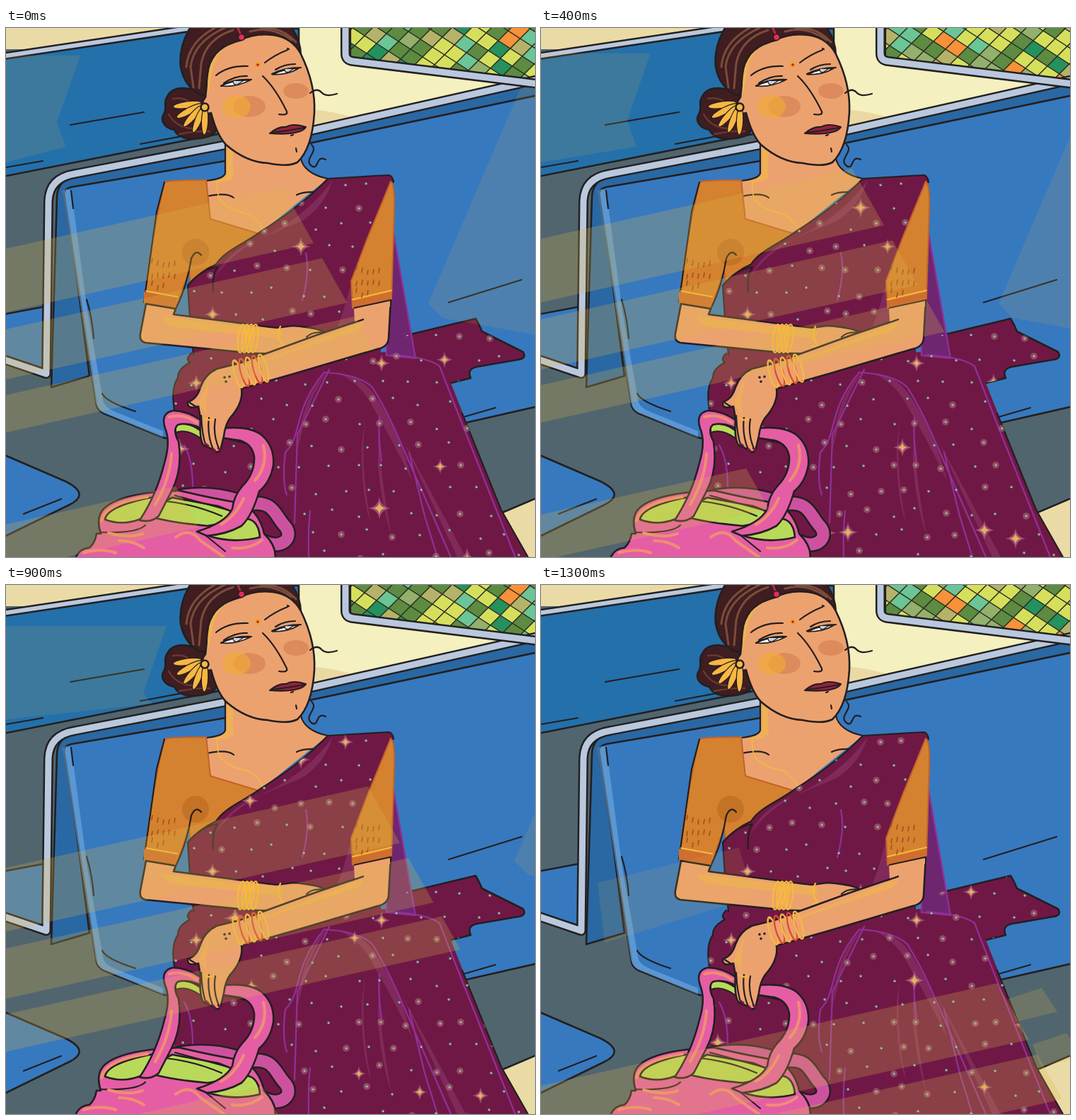
Recreate the animation shown at these times as an HTML page. Size 748 px wide and 748 px high, loop 1.5 s.

```html
<!DOCTYPE html>
<html lang="en">
<head>
<meta charset="utf-8">
<title>Afternoon train</title>
<style>
html, body { margin: 0; height: 100%; overflow: hidden; background: #51656f }
svg { display: block; width: 100vw; height: 100vh }
path, polygon { stroke-linejoin: round; stroke-linecap: round }
.o { stroke: #231f20; stroke-width: 2.6 }
.l { fill: none; stroke: #231f20; stroke-width: 2.2 }
.skin { fill: #eca26f }
.saree { fill: #701845 }
.blouse { fill: #d4822f; stroke: #c4622a; stroke-width: 2 }
.fold { fill: none; stroke: #91309a; stroke-width: 2.2 }
.sheen { fill: #a0508a; opacity: .33 }
.gold { fill: none; stroke: #f7b93e; stroke-width: 2.4 }
.warm { fill: #f0b450 }
.pink { fill: #e55ea5 }
.lime { fill: #b9d95b }
.crease { fill: none; stroke: #f08d72; stroke-width: 4 }
</style>
</head>
<body>
<svg viewBox="0 0 748 748">
<defs>
  <clipPath id="pane"><path d="M487-2V38Q487 41 492 42L748 74V-2Z"/></clipPath>
  <clipPath id="cloth"><use href="#tail"/><use href="#skirt"/><use href="#drape"/></clipPath>
  <path id="railL" d="M312 165L98 206Q61 212 60 245L57 489L-8 467"/>
  <path id="railR" d="M432 145L756 72"/>
  <path id="railB" d="M-5 40L270-1"/>
  <path id="frame" d="M480-8V36Q480 46 491 47L760 80"/>
  <path id="strapBack" d="M247 662C290 655 320 665 345 673C380 668 380 690 395 705C408 722 388 738 365 726"/>
</defs>

<!-- carriage -->
<rect width="748" height="748" fill="#51656f"/>
<path d="M0 0H420V30H0Z" fill="#eadba6"/>
<path d="M413 0H748V90L420 160Z" fill="#f4f0bf"/>
<path d="M430 115Q470 118 500 130L425 150Z" fill="#ebd9a4"/>
<path class="o" d="M-4 43L270 1H414V130L300 150L-4 210Z" fill="#2470aa"/>
<g id="tiles" clip-path="url(#pane)"></g>
<path class="l" d="M487-2V38Q487 41 492 42L748 74M91 137L195 119M190 164L280 147M0 197L52 188"/>
<path class="o" d="M-4 405L60 393V490L-4 470Z" fill="#3779bf"/>
<path class="o" d="M72 240Q72 215 100 208L312 166L430 146L752 76V110L310 200L85 235L118 492L64 508Z" fill="#2a68a3"/>
<path class="o" d="M82 234Q82 228 92 225L310 188L752 95V535L620 565L225 580L138 545Q130 541 128 534Z" fill="#3779bf"/>
<path d="M80 231Q89 223 93 235L115 400L138 530Q142 538 155 543L222 570V579L140 545Q130 541 127 530Z" fill="#7fb5e8" opacity=".5"/>
<path class="l" d="M114 384Q122 410 124 439M136 517Q142 529 183 542M92 230L95 255M626 388L729 356M647 550L692 537"/>
<g id="rails"></g>
<path class="o" d="M700 686L752 664V752H736Z" fill="#eadba6"/>
<path class="o" d="M-4 603L84 641Q120 659 90 674L-4 720Z" fill="#3779bf"/>
<path class="l" d="M25 687L78 666"/>

<!-- bun, neck and head -->
<path class="o" d="M283 98C265 82 236 80 228 97C222 104 228 112 224 120C216 132 226 142 238 144C245 160 272 158 284 154Q298 151 300 135Z" fill="#3f1d20"/>
<path d="M236 100Q260 95 270 120M230 122Q240 140 262 142M245 150Q270 145 288 146" fill="none" stroke="#693932" stroke-width="2.4"/>
<path class="skin" d="M310 145V205Q309 213 284 216L289 271L358 291L455 213Q430 212 417 185Z"/>
<path class="l" d="M310 150V205Q309 213 284 216M417 185Q422 206 455 213M284 238Q312 232 322 240M411 236Q420 231 441 232M276 254Q270 265 276 276"/>
<path class="warm" d="M313 163L323 168Q319 190 322 210Q315 220 286 218Q307 216 312 207Z" opacity=".85"/>
<path class="gold" d="M299 217Q297 236 305 246C325 264 338 258 348 266Q360 276 362 283" style="stroke-width:1.6"/>
<path class="o" d="M262-3Q244 25 247 55Q252 82 274 94L290 95L310 45L333 20L390 20L417 38Q416 15 402-3Z" fill="#3f1d20"/>
<path class="o skin" d="M333 17Q293 27 286 58L282 98Q275 106 279 116Q284 123 290 120Q298 151 311 165Q340 190 370 191Q398 197 412 190Q433 170 436 120Q438 80 417 37Q405 14 378 10Q350 7 333 17Z"/>
<path d="M321 3Q283 15 276 50L273 85M309 0Q265 20 261 55L265 84M295 0Q258 20 255 55M345 5Q375-4 404 17M360 0Q390-2 410 20" fill="none" stroke="#7a4c3b" stroke-width="3"/>
<path d="M327-2L333 12" stroke="#b32b49" stroke-width="3"/>
<circle class="o" cx="333" cy="13" r="4.5" fill="#e52c59" style="stroke-width:1.5"/>
<path class="warm" d="M322 22Q298 30 292 59L286 93Q282 60 297 38Q308 26 322 22Z"/>
<ellipse cx="344" cy="111" rx="23" ry="15" fill="#d98357" opacity=".75"/>
<ellipse cx="326" cy="111" rx="20" ry="16" fill="#f1ad35" opacity=".65"/>
<ellipse cx="410" cy="89" rx="18" ry="11" fill="#d98357" opacity=".75"/>
<g class="l">
  <path d="M304 82Q322 73 345 74Q325 84 304 82ZM377 66Q392 58 414 57Q400 66 377 66Z" fill="#fff" style="stroke-width:1.6"/>
  <path d="M297 67Q314 53 342 54M366 49Q380 38 398 31M304 82Q320 72 347 73M376 65Q393 56 417 56M308 78Q325 67 341 68M381 59Q393 51 409 51"/>
  <path d="M321 75Q321 81 327 80L335 75M394 58Q394 64 400 62L406 58" fill="#c5d3df" style="stroke-width:1.2"/>
  <path d="M363 68Q381 85 397 118Q399 124 386 122M403 152L406 151M410 170L411 175M398 29L400 30"/>
  <path d="M373 149Q385 139 396 140Q406 134 424 140Q417 152 373 149Z" fill="#97203e"/>
  <path d="M376 148Q400 145 422 141"/>
  <path d="M430 92Q440 84 446 91T468 93M432 165C443 175 420 185 432 195C443 202 437 179 452 186"/>
</g>
<circle cx="356" cy="52" r="4.2" fill="#f2a12e"/><circle cx="356" cy="52" r="1.8" fill="#b51e37"/>
<g id="earring"></g>

<!-- clothes -->
<path id="tail" class="o saree" d="M560 436L664 411L669 420L673 429L731 458Q737 467 724 469L672 478Q650 480 657 495L625 503L565 480Z"/>
<path id="skirt" class="saree" d="M262 460Q253 468 260 473Q242 482 243 495Q232 510 239 545L242 620L225 748H738L700 681L627 497Q618 474 595 468L545 458L400 462Z"/>
<path class="l" d="M262 460Q253 468 260 473Q242 482 243 495Q232 510 239 545L242 620M645 545L700 681L738 748"/>
<path class="fold" d="M548 290L579 467L538 463V390Z" style="fill:#6f2670"/>
<path class="blouse" d="M224 218Q230 215 283 215L289 270L358 291L299 338L261 362L259 343L240 397L195 388Q205 300 224 218Z"/>
<path id="drape" class="saree" d="M455 213L541 208Q547 209 548 218L508 310L488 360L497 398L530 420V466H265L260 410L257 364Q273 345 297 334C310 314 336 306 360 288Q420 250 455 213Z"/>
<path class="l" d="M265 462L260 410L257 364Q273 345 297 334C310 314 336 306 360 288Q420 250 455 213L541 208Q547 209 548 218"/>
<path class="sheen" d="M296 352Q318 319 366 294Q424 267 462 215Q450 253 418 273Q370 293 340 306Q308 324 296 352ZM487 365L495 400L494 418L447 482L477 400ZM411 600Q418 520 453 488Q432 520 424 550ZM470 488Q505 492 525 525Q558 575 574 640Q545 580 521 540Q505 505 470 488ZM508 550Q500 620 516 700Q502 660 503 590ZM527 548Q527 625 545 717Q532 680 526 620ZM560 580L650 748H638Z"/>
<path class="fold" d="M424 318Q430 345 419 385M450 487C405 540 420 575 395 600Q390 640 397 660M457 483L412 575L408 700M450 487Q500 490 518 508Q535 535 551 570L629 748M545 462Q595 465 613 478L645 560L720 748M528 550Q526 580 531 612M570 600L592 690L610 748M430 683Q427 710 428 748M252 590Q264 610 264 650"/>
<g id="sparks" clip-path="url(#cloth)"></g>
<path class="o blouse" d="M544 217Q550 222 549 255L547 320L545 383L490 396L488 358L510 300Z"/>
<circle cx="268" cy="317" r="19" fill="#b8671f" opacity=".55"/>
<path class="l" d="M224 218L213 260L195 388M276 321Q268 312 262 326Q256 365 240 397M257 364Q275 342 299 338Q291 350 293 373"/>
<path d="M195 373L242 381L240 397L195 389ZM490 386L545 373V383L490 396Z" fill="#cf6e2e"/>
<path class="gold" d="M198 372L242 380M490 384L545 371" style="stroke-width:2"/>
<g id="stitches" stroke="#a4521e" stroke-width="1.7"></g>

<!-- far arm -->
<path class="o skin" d="M198 390L190 432Q188 443 197 445L340 459Q380 463 422 454L455 434Q448 424 405 421L382 424L237 405L240 397Z"/>
<path class="warm" d="M222 408L340 423L386 425Q396 433 386 439L240 423Q220 418 222 408Z" opacity=".7"/>
<path class="l" d="M425 437Q434 428 452 431M428 442L443 438"/>
<path class="gold" d="M388 422Q382 432 388 444Q396 452 385 450"/>

<!-- bag -->
<g id="backStrap"></g>
<path class="o pink" d="M97 752Q103 736 118 735Q126 728 128 715H134Q126 690 140 678Q157 663 205 657L245 654Q285 664 338 673Q360 690 365 715Q384 734 380 752Z"/>
<path class="o lime" d="M140 695Q143 675 215 662Q208 690 188 695Q164 704 140 695Z"/>
<path class="o lime" d="M208 692Q214 674 235 664L300 676L325 686Q320 698 285 704Q238 700 208 692Z"/>
<path class="l" d="M225 669Q265 673 305 690M239 661L312 681"/>
<path class="o lime" d="M283 717Q305 708 330 694Q357 690 359 720Q320 730 283 717Z"/>
<path class="l" d="M133 713Q185 715 197 703M283 718L310 740"/>
<path class="crease" d="M135 697Q140 672 200 663M145 714Q175 722 193 715M160 725Q180 725 195 735M110 742Q135 735 155 742M240 720Q260 705 275 725L308 748M320 735Q345 738 362 724"/>
<path class="o lime" d="M240 561Q262 556 280 574L305 572Q328 574 342 588L310 580H275Q255 566 240 572Z" style="stroke-width:2"/>
<path class="o pink" d="M189 696Q213 660 224 615Q233 585 225 566Q218 545 236 541Q256 541 276 555L306 566Q345 562 362 576Q380 592 378 618Q374 642 358 655Q348 690 333 704Q312 716 284 718L270 712Q310 700 320 680Q322 662 334 648Q352 630 351 606Q348 588 330 583Q300 580 285 572Q262 556 243 561Q235 568 244 585Q250 625 234 655L216 690Q205 700 189 696Z"/>
<path class="crease" d="M211 674Q232 638 234 602M231 550Q250 544 270 558M364 590Q371 618 352 640M336 665Q325 690 304 702"/>

<!-- near arm -->
<path class="o skin" d="M493 396L544 385L541 439Q540 451 525 454L410 488L333 510Q336 530 317 551Q310 561 308 577L303 598Q296 602 293 596L279 590Q273 580 275 552L272 535Q256 540 257 529Q270 525 275 508Q281 490 298 482L330 474L440 434L505 412V400Z"/>
<path class="skin" d="M492 397L543 386V394L505 413L493 415Z"/>
<path class="warm" d="M335 480L440 441L504 416Q506 425 490 430L365 472ZM291 490Q280 520 284 548L273 530Z" opacity=".7"/>
<path class="l" d="M287 551Q284 575 293 596M296 553Q292 575 302 597M276 548Q277 575 283 592M505 412L488 418M260 530L268 535"/>
<g fill="#231f20"><circle cx="309" cy="494" r="1.8"/><circle cx="316" cy="493" r="1.8"/><circle cx="311" cy="500" r="1.8"/></g>
<path d="M282 588L286 591M293 595L296 598M300 594L303 597" stroke="#701845" stroke-width="3"/>
<path class="gold" d="M281 552Q287 556 293 553"/>
<g id="bangles"></g>

<g id="lights" fill="#dcb448"></g>
</svg>

<script>
const $ = id => document.getElementById(id);
const times = (n, f) => Array.from({ length: n }, (_, i) => f(i)).join('');
const hash = (a, b, c = 0) => {
  const s = Math.sin(a * 127.1 + b * 311.7 + c * 74.7) * 43758.5453;
  return s - Math.floor(s);
};

// An outlined tube: a dark stroke below a narrower coloured one
const tube = (id, color, w) => `<g fill="none">
  <use href="#${id}" stroke="#231f20" stroke-width="${w + 5}"/>
  <use href="#${id}" stroke="${color}" stroke-width="${w}"/></g>`;

$('rails').innerHTML = tube('railB', '#b9c8dd', 6) +
  ['railL', 'railR', 'frame'].map(id => tube(id, '#b9c8dd', 9)).join('');
$('backStrap').innerHTML = tube('strapBack', '#cc529f', 17);

$('earring').innerHTML = times(5, i =>
  `<ellipse class="o" cx="-26" cy="0" rx="20" ry="4.7" fill="#f8b743" style="stroke-width:1.2"
    transform="translate(282 105) rotate(${-8 - i * 20})"/>`) +
  '<circle class="o" cx="281" cy="112" r="5.5" fill="#f8b743"/>';

const bangle = (x, y, tilt, style = '') =>
  `<ellipse class="gold" cx="${x}" cy="${y}" rx="5" ry="20" style="${style}" transform="rotate(${tilt} ${x} ${y})"/>`;
$('bangles').innerHTML = times(4, i => bangle(333 + i * 6, 439, 6)) +
  times(5, i => bangle(328 + i * 9, 489 - i * 2, -16, i % 2 ? 'stroke:#dd4b36' : ''));

const stitchRows = (x, y) => times(13, i =>
  `<path d="M${x + i % 5 * 8} ${y + Math.floor(i / 5) * 16 + hash(i, 2) * 9}l-1 6"/>`);
$('stitches').innerHTML = stitchRows(207, 325) + stitchRows(496, 335);

// Sequins: a jittered brick lattice, cut to the cloth
const dots = [];
for (let row = 0; row < 18; row++) for (let col = 0; col < 14; col++) dots.push([
  240 + col * 38 + row % 2 * 19 + hash(row, col) * 14,
  212 + row * 31 + hash(col, row, 5) * 14
].map(Math.round));
const anchors = [[292, 405], [269, 502], [531, 474]];

const lobe = (s, color, opacity) => {
  const k = s * .12;
  return `<path d="M0 ${-s}Q${k} ${-k} ${s} 0Q${k} ${k} 0 ${s}Q${-k} ${k} ${-s} 0Q${-k} ${-k} 0 ${-s}Z" fill="${color}" opacity="${opacity}"/>`;
};
const star = ([x, y], r) =>
  `<g transform="translate(${x} ${y})">${lobe(r, '#b8708a', .65)}${lobe(r * .55, '#efc15c', .85)}</g>`;

function drawSparks(seed) {
  const spark = (p, i) => {
    const [x, y] = p, luck = hash(i, seed, 3);
    if (luck > .95) return star(p, 10 + hash(i, seed) * 7);
    const glow = luck < .33 ? `<circle cx="${x}" cy="${y}" r="4.8" fill="#b5717d" opacity=".55"/>` : '';
    return glow + `<circle cx="${x}" cy="${y}" r="1.8" fill="#69b392"/><circle cx="${x + .6}" cy="${y + .5}" r=".8" fill="#d9c1d5"/>`;
  };
  $('sparks').innerHTML = dots.map(spark).join('') + anchors.map(p => star(p, 12)).join('');
}

const colors = ['#d6df5c', '#5d8b41', '#6cc596', '#d6df5c', '#93b06c', '#f7913a', '#5d8b41', '#b5b36a', '#24915f', '#d6df5c'];

function drawTiles(shift) {
  let out = '';
  for (let i = -16; i < 24; i++) for (let j = -24; j < 16; j++) {
    const x = 490 + i * 17 - j * 14, y = i * 11 + j * 14;
    if (x < 455 || x > 780 || y < -30 || y > 80) continue;
    const color = colors[Math.floor(hash(i + shift * 3, j - shift * 2) * colors.length)];
    out += `<path d="M${x} ${y}l17 11l-14 14l-17-11z" fill="${color}" stroke="#2c3022" stroke-width="1.4"/>`;
  }
  $('tiles').innerHTML = out;
}

// Sun through the windows: y is where the top beam meets the left edge, x where it ends
const slope = .225;
const shape = (opacity, ...points) => `<polygon points="${points}" opacity="${opacity}"/>`;

function beam(y, top, bottom, end) {
  const low = end + (bottom - top) * .5;
  return shape(.25, 0, y + top, end, y + top - end * slope, low, y + bottom - low * slope, 0, y + bottom);
}

function drawLights(y, x) {
  let out = beam(y, 0, 90, x) + beam(y, 114, 185, x + 57) + beam(y, 207, 260, x + 104) + beam(y, 390, 455, x - 150);
  const tip = x + 207;
  out += shape(.13, tip + 131, 84, tip, 390, tip + 20, 410, tip + 170, 437, tip + 200, 84);
  if (y < 420) {
    const edge = x - 285, top = y * .22 - 30;
    out += shape(.13, 0, top, edge, top, edge - 33, top + 95, edge - 20, 168, 0, 190);
  } else {
    const top = y * .75 - 110;
    out += shape(.13, 80, top, 280, top - 50, 300, top + 20, 90, top + 85);
  }
  if (y > 500) for (let i = 0; i < 2; i++) {
    const px = 660 + i * 35, py = y * .43 + 281 + i * 64;
    out += shape(.2, px, py, px + 48, py - 16, px + 70, py + 18, px + 12, py + 32);
  }
  $('lights').innerHTML = out;
}

// start ms, then the y and x of the light
const poses = [
  [0, 312, 390], [100, 298, 440], [300, 298, 440], [400, 298, 440], [600, 322, 460],
  [700, 345, 480], [900, 400, 512], [1000, 458, 545], [1200, 527, 565], [1300, 708, 645]
];

let shown = -1;
function tick() {
  const t = performance.now() % 1500;
  const n = poses.findLastIndex(p => p[0] <= t);
  if (n != shown) {
    const [, y, x] = poses[shown = n];
    drawTiles(n % 6);
    drawSparks(n);
    drawLights(y, x);
  }
  requestAnimationFrame(tick);
}
tick();
</script>
</body>
</html>
```
